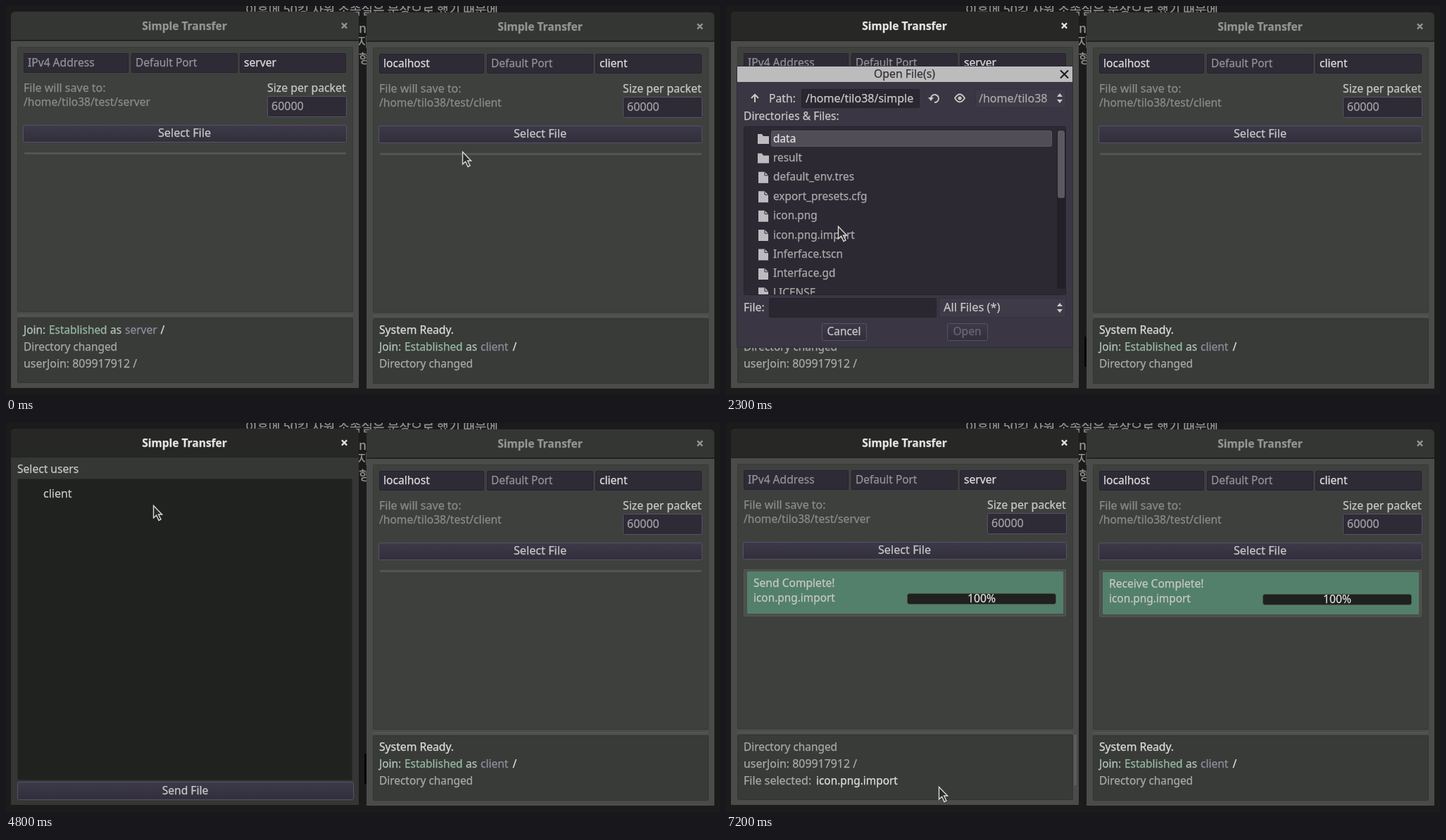
Animation of 1014x553 px, one loop 7900 ms. Source, as an HTML page:

```html
<!DOCTYPE html>
<html lang="en">
<head>
<meta charset="utf-8">
<title>Simple Transfer</title>
<style>
html, body { margin: 0; width: 100%; height: 100%; overflow: hidden; background: #1a1b1a; }
svg { display: block; width: 1014px; height: 553px; }
text { font-family: "Noto Sans", "Open Sans", sans-serif; white-space: pre; }
.ko { font-family: "Noto Sans CJK KR", "Noto Sans CJK", sans-serif; }
</style>
</head>
<body>
<script>
const LOOP = 7900;
const USER = '/home/tilo38';
const WHITE = '#dededc', LIGHT = '#c8c8c6', GREY = '#a9aaa8', DIM = '#8b8c8a';
const FIELD = '#2e2b36', EDGE = '#25232b', RIM = '#565268';

// Outlined boxes sit on half pixels so their one-pixel line stays crisp
function box(x, y, w, h, fill, stroke, r = 1) {
  const o = stroke ? .5 : 0;
  return `<rect x="${x + o}" y="${y + o}" width="${w}" height="${h}" rx="${r}" fill="${fill}" stroke="${stroke || 'none'}"/>`;
}
const label = (x, y, s, fill = GREY, size = 15.6, extra = '') =>
  `<text x="${x}" y="${y}" fill="${fill}" stroke="${fill}" stroke-width=".25" font-size="${size}" ${extra}>${s}</text>`;
const mid = (x, y, s, fill, size = 15.6, extra = '') =>
  label(x, y, s, fill, size, `text-anchor="middle" ${extra}`);
const line = (d, stroke, width = 2) =>
  `<path d="${d}" fill="none" stroke="${stroke}" stroke-width="${width}"/>`;
const shape = (d, fill = LIGHT) => `<path d="${d}" fill="${fill}"/>`;
const group = (id, body) => `<g id="${id}">${body}</g>`;
const button = (x, y, w, h, s, fill = LIGHT, size = 15.6) =>
  box(x, y, w, h, 'url(#btn)', RIM, 2) + mid(x + w / 2, y + h / 2 + 5, s, fill, size);
const cross = (x, y, r, color, width) =>
  line(`M${x - r} ${y - r}L${x + r} ${y + r}M${x + r} ${y - r}L${x - r} ${y + r}`, color, width);

function titleBar(bg, fg) {
  return shape('M7 49V15Q7 8 14 8H494Q501 8 501 15V49Z', bg) +
    box(7, 48, 494, 2, '#232422', '', 0) +
    mid(253.5, 34, 'Simple Transfer', fg, 15.5, 'font-weight="700"') +
    cross(480.5, 28, 3.6, fg, 2.2);
}

function logJoin(y, name, end) {
  return label(25, y, 'Join:', '#b4c8bb', 15.4) + label(61, y, 'Established', '#98b9a5', 15.4) +
    label(148, y, 'as', '#b4c4ba', 15.4) + label(169, y, name, '#918da0', 15.5) +
    label(end, y, '/', WHITE, 15.6);
}

function mainPage(name, host, hostColor) {
  return box(7, 49, 494, 494, '#4a4c4a') +
    box(16, 58, 476, 376, '#3e403e', '#373937') +
    box(16, 438, 476, 3, '#525452') +
    box(25, 67, 148, 27, FIELD, EDGE) + box(178, 67, 150, 27, FIELD, EDGE) + box(332, 67, 150, 27, FIELD, EDGE) +
    label(31, 85.5, host, hostColor) + label(184, 85.5, 'Default Port', '#949398', 15.4) +
    label(338, 85.5, name, WHITE, 15.6) +
    label(25, 121.5, 'File will save to:', DIM, 16) +
    label(25, 141.5, `${USER}/test/${name}`, DIM, 15.6) +
    label(371, 121.5, 'Size per packet', LIGHT, 15.8) +
    box(371, 128, 112, 29, FIELD, RIM, 2) + label(377, 148, '60000', '#a5a3a8', 16) +
    button(24, 169, 459, 24, 'Select File', LIGHT, 16.2) +
    box(26, 208, 457, 3, '#535553') +
    box(16, 443, 476, 92, '#393b39', '#333533');
}

function result(title) {
  return box(25, 208, 457, 66, '#4d4f4d', '#555755') +
    box(30, 211, 449, 60, '#53806b') +
    label(39, 233, title, LIGHT, 15.6) + label(39, 254, 'icon.png.import', LIGHT, 15.4) +
    box(257, 242, 211, 15, '#1f211f', '#465249', 3) + mid(363, 254.5, '100%', WHITE, 15.7);
}

const hover = id => group(id, box(24, 169, 459, 24, '#454153', '#625d73', 2) +
  mid(253.5, 186, 'Select File', WHITE, 16.2));

const rowY = i => 188 + i * 27.42;
const folder = y => shape(`M45 ${y - 6}H51L53 ${y - 3}H61V${y + 8}H45Z`, '#bdbbbf');
const sheet = y => shape(`M46 ${y - 7}H55L60 ${y - 2}V${y + 9}H46Z`, '#bdbbbf') +
  line(`M55 ${y - 7}V${y - 2}H60`, FIELD, 1);
const spin = (x, y) => shape(`M${x - 4} ${y - 2}L${x} ${y - 7}L${x + 4} ${y - 2}ZM${x - 4} ${y + 2}L${x} ${y + 7}L${x + 4} ${y + 2}Z`);

function dialog() {
  const files = ['data', 'result', 'default_env.tres', 'export_presets.cfg', 'icon.png',
    'icon.png.import', 'Inferface.tscn', 'Interface.gd', 'LICENSE'];
  const rows = files.map((f, i) =>
    (i < 2 ? folder : sheet)(rowY(i)) + label(67, rowY(i) + 5.5, f, GREY, 15.4)).join('');
  const chosen = (i, s) => box(64, Math.round(rowY(i)) - 11, 398, 22, '#504d57', '#5b5763', 2) +
    label(67, rowY(i) + 5.5, s, WHITE, 15.4);
  return box(15, 85, 477, 400, '#37333f', '#302d37') +
    box(16, 86, 476, 22, '#bdbcbd', '', 0) + box(16, 108, 476, 376, '#3a3643', '', 0) +
    mid(253.5, 102, 'Open File(s)', '#353338', 15.8) + cross(480.5, 97, 5.5, '#161616', 2) +
    line('M41 137V127M36 131L41 126L46 131', LIGHT) +
    label(61, 136.5, 'Path:', LIGHT, 15.7) +
    box(107, 118, 167, 26, '#2a2731', EDGE) + label(113, 136.5, USER + '/simple', LIGHT, 16) +
    line('M291 131A5.5 5.5 0 1 1 296 137', LIGHT) + shape('M287 130H295L291 135Z') +
    line('M325 131Q332 120 339 131Q332 142 325 131Z', LIGHT, 1.8) +
    '<circle cx="332" cy="131" r="2.6" fill="#c6c6c4"/>' +
    box(354, 118, 128, 26, '#3e3a47', '#35313d') + label(359, 136.5, USER, GREY, 16) + spin(474, 131) +
    label(25, 162, 'Directories &amp; Files:', LIGHT, 15.6) +
    box(25, 171, 457, 239, '#2c2933', EDGE, 2) +
    box(470, 176, 12, 226, '#222026', '', 3) + box(471, 177, 10, 96, '#5b5862', '', 3) +
    `<g clip-path="url(#tree)">${rows}</g>` +
    group('first', chosen(0, 'data')) +
    label(25, 433.5, 'File:', LIGHT, 16) + box(61, 415, 237, 27, '#2a2731', EDGE) +
    box(302, 415, 180, 27, '#3e3a47', '#35313d') + label(309, 433.5, 'All Files (*)', LIGHT, 16.4) + spin(474, 429) +
    button(136, 451, 63, 24, 'Cancel', LIGHT, 15.4) + button(314, 451, 57, 24, 'Open', '#6b6873', 15.5) +
    group('picked', box(44, 312, 420, 27, '#2c2933', '#514d59', 2) + sheet(rowY(5)) +
      chosen(5, 'icon.png.import') + label(67, 433.5, 'icon.png.import', LIGHT, 15.4) +
      button(314, 451, 57, 24, 'Open', LIGHT, 15.5));
}

function usersPage() {
  return box(7, 49, 494, 494, '#353735') + label(16, 70.5, 'Select users', LIGHT, 15.6) +
    box(16, 79, 475, 428, '#20221f', '#2a2c29') +
    label(53, 106, 'client', LIGHT, 16) +
    group('tick', line('M36 100L39.5 104L46 94.5', WHITE, 2.8)) +
    button(16, 510, 477, 25, 'Send File') +
    group('press', box(16, 510, 476, 25, '#25232b', '#6a6575', 2) +
      box(18, 513, 473, 5, '#060607') + mid(254, 527.5, 'Send File', LIGHT));
}

const left = mainPage('server', 'IPv4 Address', '#949398') +
  hover('hoverL') +
  group('logA', logJoin(465.5, 'server', 219.5) + label(25, 489.5, 'Directory changed', GREY, 15.4) +
    label(25, 513.5, 'userJoin: 809917912 /', GREY, 15.9)) +
  group('logB', label(25, 465.5, 'Directory changed', GREY, 15.4) +
    label(25, 489.5, 'userJoin: 809917912 /', GREY, 15.9) +
    label(25, 513.5, 'File selected:', GREY, 16) + label(128, 513.5, 'icon.png.import', WHITE, 15.4) +
    box(494, 443, 4, 72, '#5b5d5b')) +
  group('sent', result('Send Complete!')) +
  titleBar('#343634', '#949593') + group('lit', titleBar('#272826', '#e4e4e2')) +
  group('dialog', dialog()) + group('users', usersPage());

const right = mainPage('client', 'localhost', WHITE) + hover('hoverR') +
  label(25, 464.5, 'System Ready.', WHITE, 15.7) + logJoin(488.5, 'client', 214.5) +
  label(25, 512.5, 'Directory changed', GREY, 15.4) +
  group('received', result('Receive Complete!')) + titleBar('#343634', '#949593');

const ko = (x, y, s) => label(x, y, s, '#959593', 18, 'class="ko"');
const desktop = box(0, 0, 1014, 553, '#1a1b1a', '', 0) +
  ko(340, 12, '이후에 50킹 자원 소속실은 문장으로 했기 때문에') +
  ko(501, 38, 'nc') + ko(499, 58, '지') + ko(501, 81, '형') +
  group('gap', box(509, 470, 3, 43, '#050505'));

document.body.innerHTML = `<svg viewBox="0 0 1014 553">
<defs>
<linearGradient id="btn" x2="0" y2="1"><stop stop-color="#3d394a"/><stop offset="1" stop-color="#322f3b"/></linearGradient>
<clipPath id="tree"><rect x="25" y="171" width="457" height="239"/></clipPath>
</defs>
${desktop}${left}<g transform="translate(505 1)">${right}</g>
<g id="cursor"><path d="M.5 .5V18L4.6 14.2L8 21.5L11 20L7.6 13H12.6Z" fill="#2a2b2a" stroke="#d9d9d7" stroke-width="1.4"/></g>
</svg>`;

// Visible spans in ms
const spans = {
  hoverR: [200, 300], hoverL: [400, 900], lit: [800, LOOP], gap: [900, 6900],
  dialog: [900, 3800], first: [900, 3600], picked: [3600, 3800],
  users: [3800, 6900], tick: [5300, 6900], press: [6600, 6900],
  logA: [0, 6900], logB: [6900, LOOP], sent: [6900, LOOP], received: [6900, LOOP]
};

// Pointer stops: ms, x, y
const stops = [
  [0, 648, 207], [100, 648, 207], [250, 590, 184], [500, 440, 171], [800, 436, 170], [1000, 435, 169],
  [1300, 435, 169], [2300, 159, 313], [2600, 150, 317], [3000, 150, 317], [3400, 149, 315],
  [4250, 149, 315], [4800, 209, 117], [5100, 100, 103], [5250, 62, 98], [5450, 62, 98],
  [5850, 220, 415], [6300, 302, 517], [LOOP, 302, 517]
];

const pct = t => (t / LOOP * 100).toFixed(3) + '%';
let css = '';
for (const [id, [from, to]] of Object.entries(spans))
  css += `@keyframes ${id}{0%{opacity:0}${pct(from)}{opacity:1}${pct(to)}{opacity:0}}` +
    `#${id}{animation:${id} ${LOOP}ms step-end infinite}`;
css += '@keyframes cursor{' +
  stops.map(([t, x, y]) => `${pct(t)}{transform:translate(${x}px,${y}px)}`).join('') +
  `}#cursor{animation:cursor ${LOOP}ms ease-in-out infinite}`;
document.head.appendChild(document.createElement('style')).textContent = css;
</script>
</body>
</html>
```
